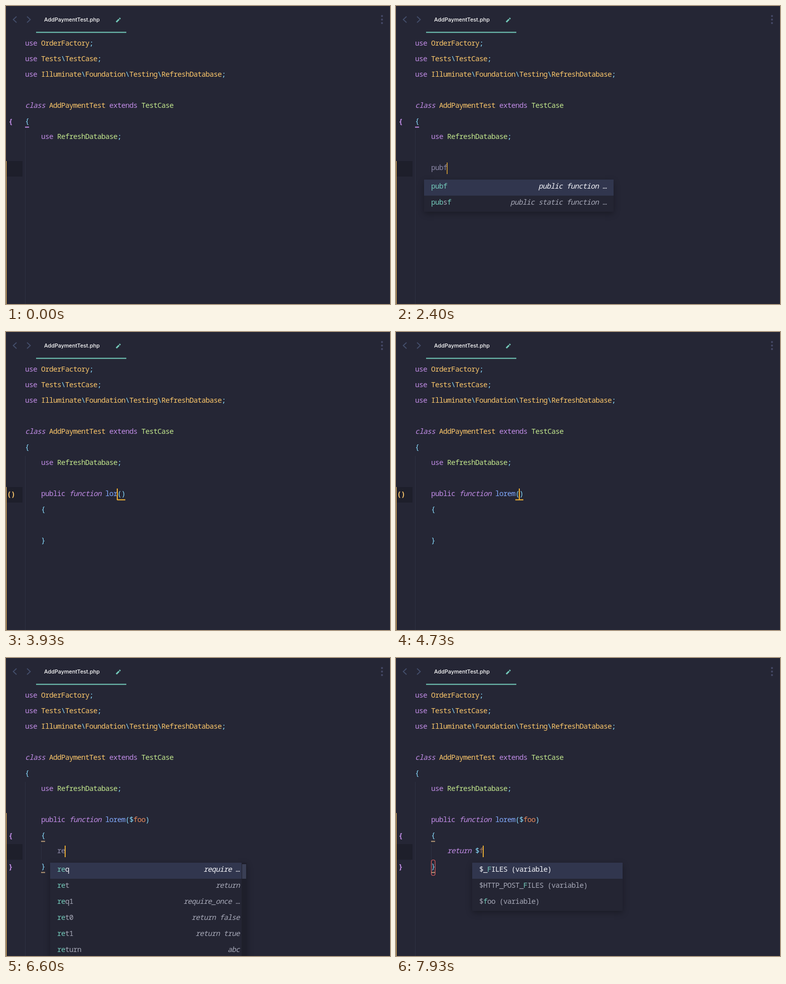
An HTML page with a canvas for the animation above (8 s loop, 766 px wide and 594 px high).

```html
<!DOCTYPE html>
<html lang="en">
<head>
<meta charset="utf-8">
<title>Editor typing</title>
<style>
  html, body { margin: 0; width: 100%; height: 100%; overflow: hidden; background: #252635; }
  canvas { display: block; }
</style>
</head>
<body>
<canvas id="stage" width="766" height="594"></canvas>
<script>
const ctx = document.getElementById('stage').getContext('2d');
const LOOP = 8000, CHAR = 8, LEFT = 38, LINE = 31;
const color = {
  bg: '#252635', dark: '#1e1f2b', guide: '#2e3041', keyword: '#c18ce6', type: '#fcc76a',
  parent: '#c3e88d', punct: '#89ddff', name: '#82aaff', variable: '#e98a5c',
  typed: '#8d89a8', typedVar: '#a0765f', caret: '#f2b335', lint: '#df6163',
  teal: '#74cbbb', popup: '#242533', selected: '#31364e', item: '#a6a8b7', nav: '#444e6b'
};
const { keyword, type, parent, punct } = color;

const colX = col => LEFT + col * CHAR;
const rowY = row => 74 + row * LINE;

function box(x, y, w, h, fill) {
  ctx.fillStyle = fill;
  ctx.fillRect(x, y, w, h);
}

function text(str, x, baseline, fill, style = '') {
  ctx.font = `${style} 14.5px "Noto Sans Mono", monospace`;
  ctx.letterSpacing = '-0.7px';
  ctx.fillStyle = fill;
  ctx.fillText(str, x, baseline);
}

// Spans are [text, color, font style].
function code(row, col, ...spans) {
  for (const [str, fill, style] of spans) {
    text(str, colX(col), rowY(row) + 5, fill, style);
    col += str.length;
  }
}

function stroke(points, fill, width) {
  ctx.beginPath();
  points.forEach(([x, y]) => ctx.lineTo(x, y));
  ctx.strokeStyle = fill;
  ctx.lineWidth = width;
  ctx.stroke();
}

// Key times for each stretch of typing.
const keys = {
  pubf: [1740, 1870, 2030, 2200],
  lorem: [3670, 3800, 3930, 4130, 4330],
  '$foo': [4930, 5200, 5330, 5470],
  ret: [6270, 6470, 6870],
  '$f': [7470, 7800]
};
const EXPAND = 2800, TO_ARGS = 4670, TO_BODY = 5870, RETURN = 7130;
const keyTimes = [...Object.values(keys).flat(), EXPAND, TO_ARGS, TO_BODY, RETURN];
const typed = (word, t) => word.slice(0, keys[word].filter(k => k <= t).length);

const globals = ['COOKIE', 'ENV', 'FILES', 'GET', 'POST', 'REQUEST', 'SERVER']
  .map(n => [`$_${n} (variable)`]);
const files = [['$_FILES (variable)'], ['$HTTP_POST_FILES (variable)']];
const returns = [['ret', 'return'], ['ret0', 'return false'], ['ret1', 'return true'], ['return', 'abc']];
const pubs = [['pubf', 'public function …'], ['pubsf', 'public static function …']];
const popups = [
  { from: 1800, to: 2200, row: 8, col: 4, width: 378, word: 'pubf', items: [...pubs, ['public', 'abc']] },
  { from: 2200, to: EXPAND, row: 8, col: 4, width: 378, word: 'pubf', items: pubs },
  { from: 3730, to: 3930, row: 8, col: 20, width: 352, word: 'lorem',
    items: [['lorem', 'Lorem ipsum …'], ['list', 'list …']] },
  { from: 5000, to: 5200, row: 8, col: 27, width: 300, word: '$foo', items: globals },
  { from: 5200, to: 5330, row: 8, col: 27, width: 300, word: '$foo', items: files },
  { from: 6330, to: 6870, row: 10, col: 8, width: 392, word: 'ret', scroll: true,
    items: [['req', 'require …'], returns[0], ['req1', 'require_once …'], ...returns.slice(1)] },
  { from: 6870, to: RETURN, row: 10, col: 8, width: 392, word: 'ret', items: returns },
  { from: 7530, to: 7800, row: 10, col: 16, width: 300, word: '$f', items: globals },
  { from: 7800, to: LOOP, row: 10, col: 16, width: 300, word: '$f', items: [...files, ['$foo (variable)']] }
];

function drawPopup({ row, col, width, word, items, scroll }, t) {
  const x = colX(col) - 14, y = rowY(row) + 24, h = items.length * 32;
  const query = typed(word, t).replace('$', '');
  ctx.save();
  ctx.shadowColor = 'rgba(0,0,0,.3)';
  ctx.shadowBlur = 12;
  ctx.shadowOffsetY = 4;
  box(x, y, width, h, color.popup);
  ctx.restore();
  box(x, y, width, 32, color.selected);
  if (scroll) {
    box(x + width - 10, y, 10, h, color.dark);
    box(x + width - 9, y + 3, 8, 29, '#3a3f55');
  }
  items.forEach(([label, hint = ''], i) => {
    const base = y + i * 32 + 18, fill = i ? color.item : '#f4f5fa';
    let matched = 0;
    [...label].forEach((ch, n) => {
      const hit = matched < query.length && ch.toLowerCase() === query[matched];
      if (hit) matched++;
      text(ch, x + 14 + n * CHAR, base, hit ? color.teal : fill);
    });
    text(hint, x + width - 14 - hint.length * CHAR, base, fill, i ? 'italic' : 'italic 500');
  });
}

function drawHeader() {
  for (const [x, dir] of [[18, -1], [45, 1]])
    stroke([[x - 3 * dir, 21], [x + 3.5 * dir, 27], [x - 3 * dir, 33]], color.nav, 1.8);
  ctx.font = '500 10.8px Inter, sans-serif';
  ctx.letterSpacing = '0px';
  ctx.fillStyle = '#fff';
  ctx.fillText('AddPaymentTest.php', 76, 31);
  box(60, 51.5, 180, 2, color.teal);
  stroke([[220, 32], [225.5, 26.5]], color.teal, 3);
  stroke([[226.3, 25.7], [228, 24]], color.teal, 3);
  for (const y of [20, 27, 34]) {
    ctx.beginPath();
    ctx.arc(750, y, 2, 0, 7);
    ctx.fillStyle = '#454966';
    ctx.fill();
  }
}

function drawClass() {
  const use = ['use ', keyword], semi = [';', punct], slash = ['\\', punct];
  code(0, 0, use, ['OrderFactory', type], semi);
  code(1, 0, use, ['Tests', type], slash, ['TestCase', type], semi);
  code(2, 0, use, ['Illuminate', type], slash, ['Foundation', type], slash,
    ['Testing', type], slash, ['RefreshDatabase', type], semi);
  code(4, 0, ['class ', keyword, 'italic'], ['AddPaymentTest ', type],
    ['extends ', keyword], ['TestCase', parent]);
  code(5, 0, ['{', punct]);
  code(6, 4, use, ['RefreshDatabase', parent], semi);
}

const underline = (row, col, fill, chars = 1) =>
  box(colX(col), rowY(row) + 11.5, chars * CHAR, 2, fill);
const gutter = (row, str, fill) =>
  text(str, str.length > 1 ? 2 : 5, rowY(row) + 6, fill, 'bold');

function drawLint(row, col) {
  ctx.beginPath();
  ctx.roundRect(colX(col) + .5, rowY(row) - 12.5, 7.5, 31, 3.5);
  ctx.strokeStyle = color.lint;
  ctx.lineWidth = 1.2;
  ctx.stroke();
}

function drawMethod(t) {
  const name = typed('lorem', t), arg = typed('$foo', t);
  const open = 20 + name.length, close = open + 1 + arg.length;
  code(8, 4, ['public ', keyword], ['function ', keyword, 'italic'], [name, color.name],
    ['(', punct], [arg.slice(0, 1), punct], [arg.slice(1), color.variable], [')', punct]);
  code(9, 4, ['{', punct]);
  code(11, 4, ['}', punct]);

  if (t < TO_BODY) {
    gutter(8, '()', type);
    underline(8, open, color.caret);
    underline(8, close, color.caret);
    if (t >= 3270 && t < 3930) drawLint(8, open);
    if (t >= 5330) drawLint(8, open + 1);
    return [8, t < TO_ARGS ? open : close];
  }

  for (const [row, brace] of [[9, '{'], [11, '}']]) {
    gutter(row, brace, keyword);
    underline(row, 4, '#b99b78');
  }
  box(colX(4), rowY(10) - 13, 1, LINE, color.guide);
  if (t >= 7000) drawLint(11, 4);
  const word = typed('ret', t), variable = typed('$f', t);
  if (t < RETURN) {
    code(10, 8, [word, color.typed]);
    return [10, 8 + word.length];
  }
  code(10, 8, ['return ', keyword, 'italic'], [variable.slice(0, 1), punct],
    [variable.slice(1), color.typedVar]);
  return [10, 15 + variable.length];
}

function drawSnippet(t) {
  const word = typed('pubf', t);
  code(8, 4, [word, color.typed]);
  gutter(5, '{', keyword);
  underline(5, 0, keyword);
  return [8, 4 + word.length];
}

// The caret pulses once a second and restarts fully lit on each key.
function caretAlpha(t) {
  const last = Math.max(-500, ...keyTimes.filter(k => k <= t));
  const phase = (t - last + (last < 0 ? -500 : 500)) / 1000;
  return Math.min(1, Math.max(0, .5 - .62 * Math.cos(phase * 2 * Math.PI)));
}

function draw(t) {
  box(0, 0, 766, 594, color.bg);
  drawHeader();
  box(LEFT, 247, 1, 347, color.guide);
  box(1, rowY(t < TO_BODY ? 8 : 10) - 13, 32, LINE, color.dark);
  box(0, 309, 1.2, 285, '#e8b866');
  drawClass();
  const [row, col] = t < EXPAND ? drawSnippet(t) : drawMethod(t);
  ctx.globalAlpha = caretAlpha(t);
  box(colX(col) - 1, rowY(row) - 10, 2, 23, color.caret);
  ctx.globalAlpha = 1;
  const popup = popups.find(p => t >= p.from && t < p.to);
  if (popup) drawPopup(popup, t);
}

const start = performance.now();
function tick() {
  draw((performance.now() - start) % LOOP);
  requestAnimationFrame(tick);
}
tick();
</script>
</body>
</html>
```
